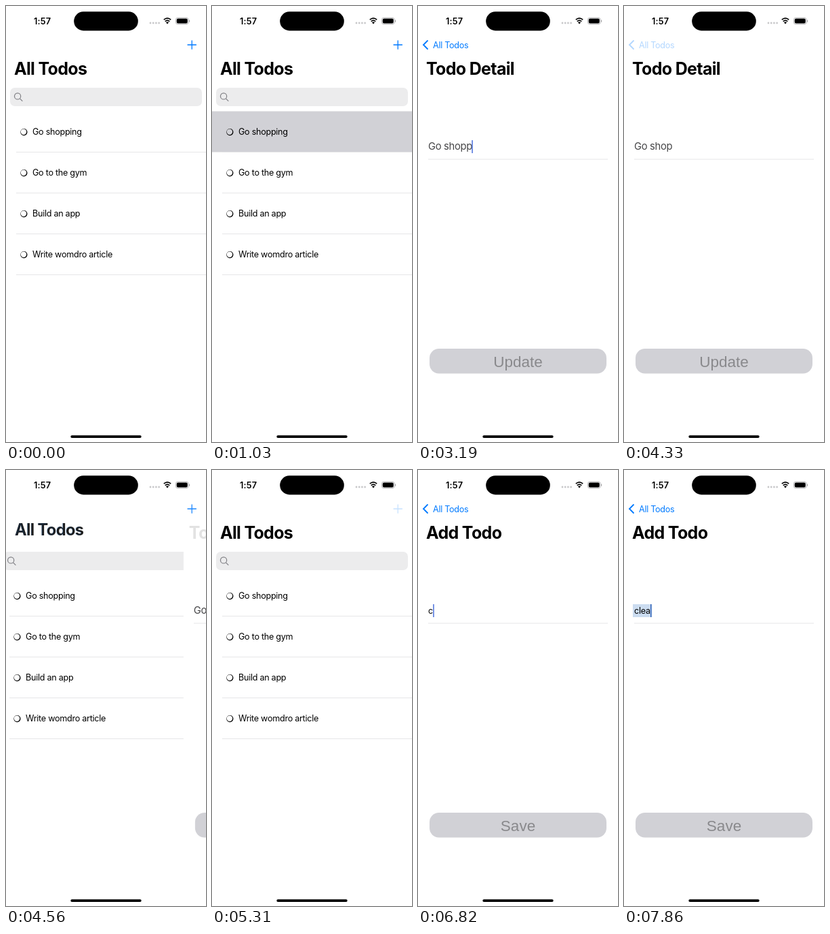
An HTML page with a canvas for the animation above (8 s loop, 295x640 px).

```html
<!DOCTYPE html>
<html lang="en">
<head>
<meta charset="utf-8">
<title>Todo app</title>
<style>
  html, body { margin: 0; width: 100%; height: 100%; overflow: hidden; background: #fff; }
  canvas { display: block; }
</style>
</head>
<body>
<canvas id="stage" width="295" height="640"></canvas>
<script>
const W = 295, H = 640, LOOP = 8000;
const BLUE = '#007aff', LINE = '#e6e6e8';
const ctx = document.getElementById('stage').getContext('2d');

const TICKS = [0, 1030, 1140, 1240, 1350, 1470, 1860, 2340, 2540, 2680, 3190, 3700, 3820, 4060, 4180,
  4330, 4440, 4560, 4670, 4770, 5310, 5560, 5670, 5780, 5900, 6300, 6820, 6930, 7050, 7320, 7540, 7750, 7860];

const OPEN_DETAIL = 1054, GO_BACK = 4355, OPEN_ADD = 5471;
const TODOS = ['Go shopping', 'Go to the gym', 'Build an app', 'Write womdro article'];
const DETAIL_EDITS = [[0, 'Go shopping'], [2340, 'Go shoppin'], [2540, 'Go shoppi'], [2680, 'Go shopp'], [3700, 'Go shop']];
const ADD_EDITS = [[0, ''], [6820, 'c'], [7320, 'cl'], [7540, 'cle'], [7750, 'clea']];

const lerp = (a, b, k) => a + (b - a) * k;
const clamp = k => Math.max(0, Math.min(1, k));
const valueAt = (edits, t) => edits.filter(e => e[0] <= t).pop()[1];
const spring = ms => { const k = Math.max(0, ms) * 0.01826; return 1 - (1 + k) * Math.exp(-k); };

function pushProgress(t) {
  if (t < GO_BACK) return spring(t - OPEN_DETAIL);
  if (t < OPEN_ADD) return 1 - spring(t - GO_BACK);
  return spring(t - OPEN_ADD);
}

function faded(alpha, draw) {
  ctx.save();
  ctx.globalAlpha *= alpha;
  draw();
  ctx.restore();
}

function shifted(x, draw) {
  ctx.save();
  ctx.translate(x, 0);
  draw();
  ctx.restore();
}

function rect(x, y, w, h, color, radius = 0) {
  ctx.fillStyle = color;
  ctx.beginPath();
  ctx.roundRect(x, y, w, h, radius);
  ctx.fill();
}

function circle(x, y, r, color) {
  ctx.fillStyle = color;
  ctx.beginPath();
  ctx.arc(x, y, r, 0, 7);
  ctx.fill();
}

function stroke(path, color, width, cap = 'round') {
  ctx.strokeStyle = color;
  ctx.lineWidth = width;
  ctx.lineCap = cap;
  ctx.stroke(new Path2D(path));
}

// Draws a line of text and returns where it ends.
function text(str, x, y, { size = 12.6, weight = 400, spacing = -0.022 * size, color = '#000', align = 'left', family = 'Inter' } = {}) {
  ctx.font = `${weight} ${size}px ${family}, sans-serif`;
  ctx.letterSpacing = spacing + 'px';
  ctx.textAlign = align;
  ctx.fillStyle = color;
  ctx.fillText(str, x, y);
  return x + ctx.measureText(str).width;
}

const title = (str, x, y, size = 25) => text(str, x, y, { size, weight: 700, spacing: -0.027 * size });

function drawStatusBar() {
  text('1:57', 53.7, 26.6, { size: 12.75, weight: 600, spacing: 0.2, align: 'center' });
  rect(100.2, 8.3, 94.6, 27.9, '#000', 14);
  for (let i = 0; i < 4; i++) circle(213 + i * 4.2, 25, 1.4, '#c8c8ca');
  stroke('M232.8 20.2Q238 15.6 243.2 20.2M234.7 22.6Q238 19.6 241.3 22.6', '#000', 1.7, 'butt');
  ctx.fillStyle = '#000';
  ctx.fill(new Path2D('M235.9 24.1Q238 22.5 240.1 24.1L238 26.5Z'));
  ctx.strokeStyle = '#a8a8aa';
  ctx.lineWidth = 0.9;
  ctx.beginPath();
  ctx.roundRect(250.4, 17.3, 18.6, 9.4, 3);
  ctx.stroke();
  rect(251.7, 18.6, 16, 6.8, '#000', 1.9);
  rect(270, 20.3, 1.1, 3.4, '#a8a8aa', 0.6);
}

function drawList(t) {
  rect(6, 120, 283, 27, '#ececed', 7);
  stroke('M21.7 132.4a4.6 4.6 0 1 0-9.2 0a4.6 4.6 0 1 0 9.2 0M20.5 135.8L24 139.3', '#7f7f84', 1.2);
  if (t >= 1030 && t < GO_BACK) rect(0, 154.5, W, 60, '#d1d1d6');
  TODOS.forEach((todo, i) => {
    const y = 185 + i * 60;
    ctx.fillStyle = '#000';
    ctx.beginPath();
    ctx.arc(26.4, y + 0.1, 5.1, 0, 7);
    ctx.closePath();
    ctx.moveTo(30.2, y - 0.3);
    ctx.arc(26, y - 0.3, 4.2, 0, 7);
    ctx.fill('evenodd');
    text(todo, 39, y + 4.4);
    rect(15, y + 29, W, 1, LINE);
  });
}

function drawCaret(x, alpha, color = '#4a6fdc') {
  faded(alpha, () => rect(x - 0.7, 197, 1.5, 19, color));
}

function drawDetailForm(t) {
  const end = text(valueAt(DETAIL_EDITS, t), 15, 211.3, { size: 14.8, color: '#464648' });
  const blink = t < 4060 ? 1 : t < 4180 ? 0.5 : 0;
  if (t >= 1860) drawCaret(end, blink);
}

function drawAddForm(t) {
  const value = valueAt(ADD_EDITS, t), marked = t >= 7860;
  if (marked) rect(13, 197, 28.5, 19, '#cbdcf0');
  const end = text(value || 'Add Todo', 15, 210.8, { color: value ? '#000' : '#c4c4c7' });
  if (t >= 6300) drawCaret(value ? end + 1 : 15.5, 1, marked ? '#2f62b8' : undefined);
}

function drawForm(t, adding) {
  rect(0, 0, W, H, '#fff');
  (adding ? drawAddForm : drawDetailForm)(t);
  rect(15, 224.5, 265, 1, LINE);
  rect(17, 503, 261, 36.5, '#d1d1d6', 14);
  text(adding ? 'Save' : 'Update', 147.5, 529.5,
    { size: 22.5, spacing: 0, color: '#89898c', align: 'center', family: 'Liberation Sans' });
}

// The list heading shrinks into the back link while the form heading slides in.
function drawNavigation(t, p, x, adding) {
  const headX = lerp(12, 22, p), headY = lerp(100.7, 61.6, p), size = lerp(25, 12.6, p);
  const pressed = t >= 4330 && t < GO_BACK ? 0.3 : 1;
  faded(1 - p, () => title('All Todos', headX, headY, size));
  faded(p * pressed, () => text('All Todos', headX, headY, { size, color: BLUE }));
  faded(clamp((p - 0.3) / 0.7) * pressed, () =>
    shifted(Math.min(1, x / 9), () => stroke('M14 51L8 57L14 63', BLUE, 1.8)));
  faded((1 - p) * (t >= 5310 ? 0.22 : 1), () => stroke('M268 57H280.4M274.2 50.8V63.2', BLUE, 1.3));
  faded(p, () => title(adding ? 'Add Todo' : 'Todo Detail', 12 + Math.max(0, x - 4), 100.7));
}

function draw(t) {
  const p = pushProgress(t), x = W * (1 - p), adding = t >= OPEN_ADD;
  rect(0, 0, W, H, '#fff');
  shifted(-0.3 * W * p, () => drawList(t));
  faded(0.1 * p * p, () => rect(0, 0, W, H, '#000'));
  shifted(x, () => drawForm(t, adding));
  drawNavigation(t, p, x, adding);
  drawStatusBar();
  rect(95.3, 630.2, 104.4, 3.8, '#000', 1.9);
}

const start = performance.now();
function tick() {
  const now = (performance.now() - start) % LOOP;
  draw(TICKS.filter(t => t <= now).pop());
  requestAnimationFrame(tick);
}
tick();
</script>
</body>
</html>
```
